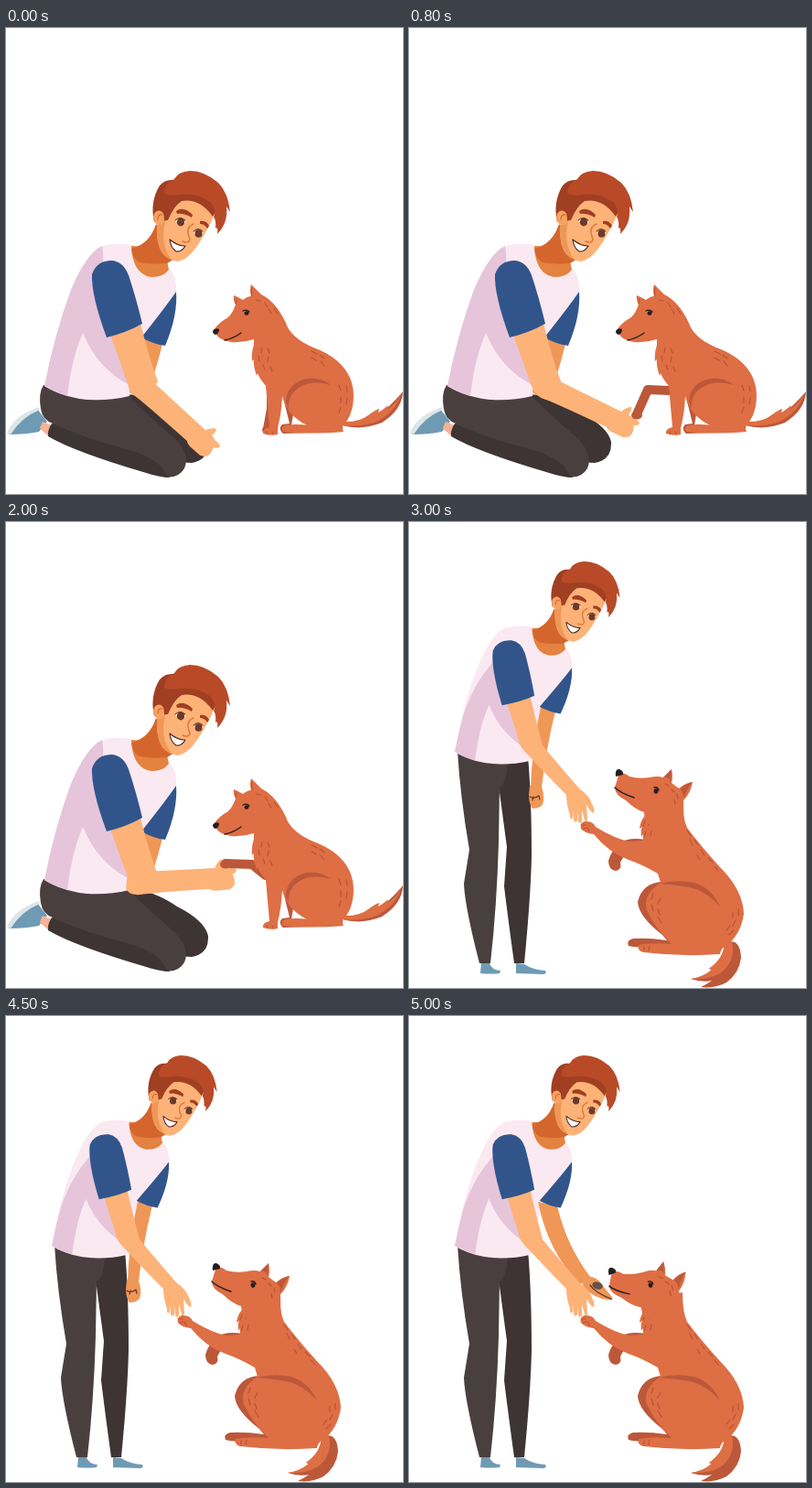
An HTML page for the animation above (6 s loop, 434 by 509 pixels).

```html
<!DOCTYPE html>
<html lang="th">
<head>
<meta charset="utf-8">
<title>Shake hands</title>
<style>
html, body { margin: 0; width: 100%; height: 100%; overflow: hidden; background: #fff; }
svg { display: block; width: 434px; height: 509px; }
.skin { fill: #fdb278; }
.tan { fill: #ef9757; }
.neck { fill: #d4662d; }
.hair { fill: #b94a27; }
.hair2 { fill: #a03f22; }
.shirt { fill: #fae9f1; }
.shirt2 { fill: #e6c5da; }
.blue { fill: #31558b; }
.pants { fill: #4a3f3f; }
.pants2 { fill: #3e3434; }
.shoe { fill: #6f9ab3; }
.dog { fill: #de6e44; }
.dog2 { fill: #bc583a; }
.ink { fill: #231f20; }
.line { fill: none; stroke-linecap: round; stroke-linejoin: round; }
.fur { stroke: #b75234; stroke-width: 1.1; }
</style>
</head>
<body>
<svg viewBox="0 0 434 509" xmlns="http://www.w3.org/2000/svg">
<defs>
  <g id="bust">
    <path class="shirt" d="M105 238Q120 234 137 237L178 263Q187 270 186 289Q178 310 149 338L135 402Q92 412 58 399Q48 395 42 391Q53 335 71 286Q88 246 105 238Z"/>
    <path class="shirt2" d="M105 238Q108 254 104 270L112 330L136 350L135 390Q100 372 84 333Q72 360 67 402Q52 397 42 391Q53 335 71 286Q88 246 105 238Z"/>
    <path fill="#e4823f" d="M137 238Q138 268 158 272Q171 273 178 264L173 240Z"/>
    <path class="neck" d="M164 214Q157 236 137 241Q138 252 146 256Q160 259 176 257L188 250Z"/>
    <path class="hair2" d="M162 212Q157 190 168 172Q174 165 183 166L206 182L190 188L176 211Z"/>
    <path class="skin" d="M190 184Q212 181 229 196Q227 208 221 218Q213 233 206 242Q198 253 188 255Q178 254 171 246Q165 238 165 219L174 211Z"/>
    <path class="tan" d="M165 215L174 211Q168 236 181 253Q163 246 165 215Z"/>
    <ellipse cx="167.500" cy="207.500" rx="6.300" ry="8" transform="rotate(-12 167.500 207.500)" fill="#f6a263"/>
    <path class="line" stroke="#d4662d" stroke-width="1.2" d="M171 204Q166 203 166 209"/>
    <path class="hair2" d="M173 178Q171 192 173 210L177 210Q183 195 192 189Q212 186 226 206L232 196Q215 176 186 177Z"/>
    <path class="hair" d="M173 181Q173 170 184 165Q188 157 201 156Q217 156 232 169Q243 180 245 201L241 195Q243 213 231 225Q232 216 229 219Q230 211 227 206Q231 199 223 190Q209 180 191 182Q179 184 173 181Z"/>
    <path class="hair2" d="M186 200Q194 194 204 204L203 207Q194 202 187 203ZM212 211Q219 210 222 216L220 219Q217 214 212 214Z"/>
    <path fill="#fff" d="M185 211Q191 206 197 212Q192 217 185 211ZM205 224Q210 218 216 224Q212 229 205 224Z"/>
    <ellipse cx="191" cy="212" rx="4.2" ry="4.4" fill="#6b3a2b"/>
    <ellipse cx="210.500" cy="224.500" rx="4" ry="4.2" fill="#6b3a2b"/>
    <path class="line" stroke="#512719" stroke-width="1" d="M185 210Q190 205 196 210M205 222Q210 217 215 222"/>
    <path class="line" stroke="#d97c3c" stroke-width="1.5" d="M205 214Q198 217 199 224L201 231Q200 236 193 233"/>
    <path fill="#fff" stroke="#522c22" stroke-width="1.2" stroke-linejoin="round" d="M179 231Q187 238 196 238Q192 245 186 244Q180 240 179 231Z"/>
  </g>
  <path id="farSleeve" class="blue" d="M186 288Q175 304 148 338Q160 345 174 347Q188 314 186 288Z"/>
  <path id="sleeve" class="blue" d="M94 269Q99 254 116 254Q128 255 134 270Q142 294 149 323Q131 333 110 338Q93 292 94 269Z"/>
</defs>

<g id="kneel">
  <path class="shoe" d="M3 444Q12 429 34 416L45 430L36 441Q22 444 3 444Z"/>
  <path fill="#dce5e7" d="M1 442Q9 423 36 414L37 417Q17 425 5 444Z"/>
  <path fill="#f5b397" d="M40 430L50 434L46 445Q39 440 37 437Z"/>
  <path class="pants2" d="M133 400Q161 402 187 420Q217 435 221 452Q222 472 203 475L185 474L120 420Z"/>
  <path class="pants" d="M41 390Q35 399 38 416Q40 428 51 432L47 444Q70 458 172 490Q188 493 195 481Q202 465 183 447Q158 426 133 401Z"/>
  <path class="pants2" d="M50 432Q88 449 132 460Q156 466 170 479Q175 490 180 491Q168 491 150 485Q75 463 46 446Q45 440 50 432Z"/>
  <use href="#bust"/>
  <path class="tan" d="M147 336L171 345Q166 366 161 380L140 401L135 398Q136 386 140 375Z"/>
  <use href="#farSleeve"/>
  <path class="skin" d="M114 335L147 323Q157 362 166 386L150 406Q138 403 134 391Z"/>
  <path id="forearm" class="skin" d="M150 372L167 387L232 419Q238 414 243 414Q244 418 240 422L246 427Q252 429 252 432Q250 435 246 434L245 440Q243 448 234 447L221 441Q217 439 216 436Q165 412 150 406Q137 402 136 392Z"/>
  <use href="#sleeve"/>
  <path id="pawLeg" class="line" stroke="#bc583a" stroke-width="10"/>
  <ellipse id="paw" class="dog2" rx="6" ry="4.500"/>
  <path class="dog2" d="M300 392L320 386L312 434L368 433L368 441L303 443Q297 438 302 433L310 432Z"/>
  <path class="dog2" d="M367 431Q398 440 434 397Q433 417 411 431Q389 440 367 434Z"/>
  <path class="dog" d="M367 430Q386 431 396 423Q404 417 408 416L407 420Q412 417 418 412L416 417Q427 410 433 398Q425 422 402 431Q384 436 367 434Z"/>
  <path class="dog" d="M228 329Q232 322 243 316Q248 311 251 302Q248 297 249 292Q254 294 259 297Q264 293 268 293Q266 286 268 280Q273 285 279 291Q297 300 308 327Q315 340 336 349Q366 360 376 382Q384 402 376 423Q371 433 367 435L369 441Q333 444 303 441Q300 436 305 434Q317 432 329 434Q307 423 302 402Q301 422 297 437L297 444Q288 446 281 443Q280 438 288 436L284 391Q276 381 275 377L274 380Q270 368 271 362L269 364Q268 355 271 346L271 340Q259 344 246 343Q234 341 230 335Z"/>
  <path class="dog2" d="M306 408Q307 390 325 384Q342 380 355 390Q333 384 320 393Q307 401 309 417Z"/>
  <path class="ink" d="M226 331Q228 327 233 329Q233 334 229 335Q226 334 226 331Z"/>
  <ellipse class="ink" cx="263" cy="311.500" rx="2.500" ry="2.300"/>
  <path class="line" stroke="#231f20" stroke-width="1.300" d="M239 341Q249 339 257 333M259 309Q263 307 266 310"/>
  <path class="line fur" d="M269 293Q268 287 269 284M251 301L252 296M273 297l5 1M283 300l3 5M287 307l3 5M293 306l4 6M286 350l2 5M280 349l-1 6M276 358l1 6M287 359l-1 6M281 368l2 5M289 370l2 5M334 353l6 3M343 357l5 4M334 360l5 3M344 364l4 5M364 390l2 6M372 391l1 6M366 403l0 6M373 404l-1 7M366 414l-2 6M285 441l1 2M291 441l1 2"/>
</g>

<g id="stand">
  <path class="shoe" d="M79 482L88 482Q90 489 100 490L99 493Q90 494 78 493ZM117 482L126 483Q135 489 149 490Q151 493 147 494L117 493Z"/>
  <path class="pants2" d="M104 258L130 256Q134 300 134 365Q133 410 126 482L115 482Q108 431 104 398L107 355L98 288Z"/>
  <path class="pants" d="M53 250L108 258Q108 284 99 290L98 350Q96 420 89 482L77 482Q61 420 60 395L66 358Q56 300 53 250Z"/>
  <use href="#bust" transform="matrix(.89 0 0 .885 12.6 -95)"/>
  <path class="shirt" d="M106 115.500Q90 121 75 159Q62 192 56 222Q68 178 94 151L114 142L116 114Z"/>
  <path id="farArm" class="tan"/>
  <g id="fist">
    <path class="tan" d="M132 288L144 288Q148 295 147 305Q146 313 135 313Q131 308 131 298Z"/>
    <path class="line" stroke="#5b2f20" stroke-width="1.100" d="M132 300Q137 303 142 299M136 300l-1 4M142 299l1 4"/>
  </g>
  <g id="openHand">
    <path class="tan" d="M188 285L200 285Q209 288 213 296L222 307Q224 311 218 310Q204 309 191 297Z"/>
    <path class="line" stroke="#4b2a20" stroke-width="1.300" d="M198 294Q203 302 221 309"/>
    <ellipse cx="206" cy="294.500" rx="5.800" ry="4" transform="rotate(18 206 294.500)" fill="#65534c"/>
  </g>
  <use href="#farSleeve" transform="matrix(.89 0 -.03 .85 21.2 -85.5)"/>
  <path class="skin" d="M107 197L132 188Q138 214 146 244Q165 267 187 292Q197 298 201 310Q204 317 201 318Q197 315 194 309L195 325Q194 329 192 326L189 315L189 327Q187 331 185 327L184 316L184 326Q181 330 180 325L179 315L179 323Q176 327 176 320Q172 308 172 298Q154 280 126 250Q120 243 120 238Z"/>
  <use href="#sleeve" transform="translate(112 129.300) rotate(4) scale(.888 .85) translate(-116 -254)"/>

  <path class="dog2" d="M259 347Q239 344 230 351Q220 361 218 370Q218 380 226 381Q233 380 231 372Q235 363 242 361Z"/>
  <path class="dog2" d="M277 393Q255 394 250 415Q251 431 277 451L282 457Q262 454 245 455Q237 457 240 463Q250 466 290 464L300 400Z"/>
  <path class="dog2" d="M345 460Q362 453 363 476Q361 493 347 503Q334 510 319 508Q327 504 331 501Q320 503 308 499Q322 497 331 489L328 488Q344 477 345 460Z"/>
  <path class="dog" d="M345 460L353 458Q358 480 340 493Q327 500 308 499Q322 497 331 489L328 488Q344 477 345 460Z"/>
  <path class="dog" d="M262 306L299 302Q299 323 304 334Q319 354 340 377Q365 402 366 428Q363 450 347 463Q341 465 340 472Q299 475 256 470Q249 468 251 462Q264 459 287 461Q269 444 260 424Q255 407 275 394L272 384Q255 374 240 369Q218 361 202 341Q192 340 188 335Q186 329 192 327Q201 326 204 333Q225 346 241 349L256 348L256 341L254 344Q253 336 255 333L252 335Q253 326 258 321Z"/>
  <path class="dog2" d="M273 395Q292 390 312 394Q331 400 340 420Q325 403 307 399Q289 396 273 395Z"/>
  <path class="line fur" d="M189 331l4 0M190 335l4 -1M197 338l-2 -4M258 326l-2 6M264 324l-2 7M259 338l-2 6M265 337l-1 6M272 319l-1 5M278 318l-1 5M304 337l4 6M312 347l4 6M307 347l3 6M319 358l4 6M327 367l5 5M315 364l3 5M334 376l4 5M267 406l-2 6M265 418l2 7M272 431l4 7M275 411l-3 6M272 423l2 6M360 423l0 7M354 426l0 6M357 435l-3 6M351 441l-4 5M355 446l-5 5M257 464l0 4M263 463l-1 5"/>
  <g id="head">
    <path class="dog" d="M229 277Q234 272 241 278Q251 281 263 279Q272 277 278 279L287 270Q289 279 287 285L295 291Q302 285 310 284Q308 296 300 304Q300 318 301 332Q280 342 258 327L257 317Q247 314 237 304Q225 298 225 290Z"/>
    <path class="dog2" d="M278 279L287 270L286 284Q285 278 278 279ZM296 292Q302 286 310 284Q305 289 300 302Q300 294 296 292Z"/>
    <path class="ink" d="M226 278Q225 269 230 270Q235 272 234 276Q230 277 226 278Z"/>
    <ellipse class="ink" cx="270" cy="294" rx="2.400" ry="2.700"/>
    <path class="line" stroke="#231f20" stroke-width="1.400" d="M225 290Q231 296 246 301M268 290Q272 289 273 293"/>
    <path class="line fur" d="M280 286l4 2M287 292l3 3M293 297l1 5M290 303l1 5"/>
  </g>
</g>

<g id="bubble" fill="#2e3192" role="img" aria-label="จับมือ">
  <ellipse cx="357" cy="43" rx="68.500" ry="43"/>
  <circle cx="277.500" cy="74.500" r="9.700"/>
  <circle cx="252.300" cy="95" r="6.500"/>
  <g class="line" stroke="#fff" stroke-width="5.200">
    <path d="M322 41Q326 36 331 40Q334 47 331 54Q326 53 324 48L328 48"/>
    <path d="M340 40Q344 38 343 43L342 53L353 53L354 38"/>
    <path d="M360 39Q364 38 363 43L362 51Q358 54 361 54Q367 47 373 54L374 39"/>
    <path d="M382 43Q385 37 391 40Q394 46 391 54L382 54L382 48L386 48"/>
    <path stroke-width="3.800" d="M333 29Q335 27 337 30Q341 34 346 28M359 32Q360 27 367 27L374 32ZM369 28L369 25M375 31L375 25"/>
  </g>
</g>
</svg>
<script>
const $ = id => document.getElementById(id);
const clamp = x => Math.min(1, Math.max(0, x));
const mix = (a, b, p) => a.map((v, i) => v + (b[i] - v) * p);
const show = (id, on) => $(id).style.display = on ? "" : "none";

// Dog foreleg: shoulder, knee, foot
const planted = [290, 391, 290, 416, 286, 438];
const offered = [285, 396, 261, 395, 249, 422];
const shaking = [284, 386, 269, 374, 240, 373];

// Far arm outline, hanging and reaching out
const hanging = [160, 207, 150, 246, 145, 290, 133, 290, 134, 250, 144, 202];
const reaching = [162, 207, 172, 251, 199, 286, 187, 293, 152, 258, 141, 203];

function drawKneel(step) {
  const reach = clamp(step / 7);
  const lift = clamp((step - 17) / 3);
  $("forearm").setAttribute("transform",
    `rotate(${-29 * lift} 151 406) rotate(${16.5 * (1 - reach)} 155 381)`);
  const leg = mix(mix(planted, offered, clamp(step / 8)), shaking, lift);
  const [sx, sy, kx, ky, fx, fy] = leg;
  $("pawLeg").setAttribute("d", `M${sx} ${sy}L${kx} ${ky}L${fx} ${fy}`);
  $("paw").setAttribute("transform", `translate(${fx} ${fy + 1})`);
}

function drawStand(step) {
  const p = clamp((step - 45) / 5);
  const [ax, ay, bx, by, cx, cy, dx, dy, ex, ey, gx, gy] = mix(hanging, reaching, p);
  $("farArm").setAttribute("d",
    `M${ax} ${ay}Q${bx} ${by} ${cx} ${cy}L${dx} ${dy}Q${ex} ${ey} ${gx} ${gy}Z`);
  show("fist", p < .4);
  show("openHand", p >= .4);
  $("fist").setAttribute("transform", `translate(${cx - 145} ${cy - 290})`);
  $("openHand").setAttribute("transform", `translate(${cx - 199} ${cy - 286})`);
  $("head").setAttribute("transform", `translate(${-6 * p} 0) rotate(${-6.5 * p} 270 294)`);
}

function draw(ms) {
  const step = Math.floor(ms % 6000 / 100);
  const standing = step >= 30;
  show("kneel", !standing);
  show("stand", standing);
  show("bubble", step >= 35 && step < 45);
  if (standing) drawStand(step); else drawKneel(step);
}

const start = performance.now();
function tick() {
  draw(performance.now() - start);
  requestAnimationFrame(tick);
}
tick();
</script>
</body>
</html>
```
